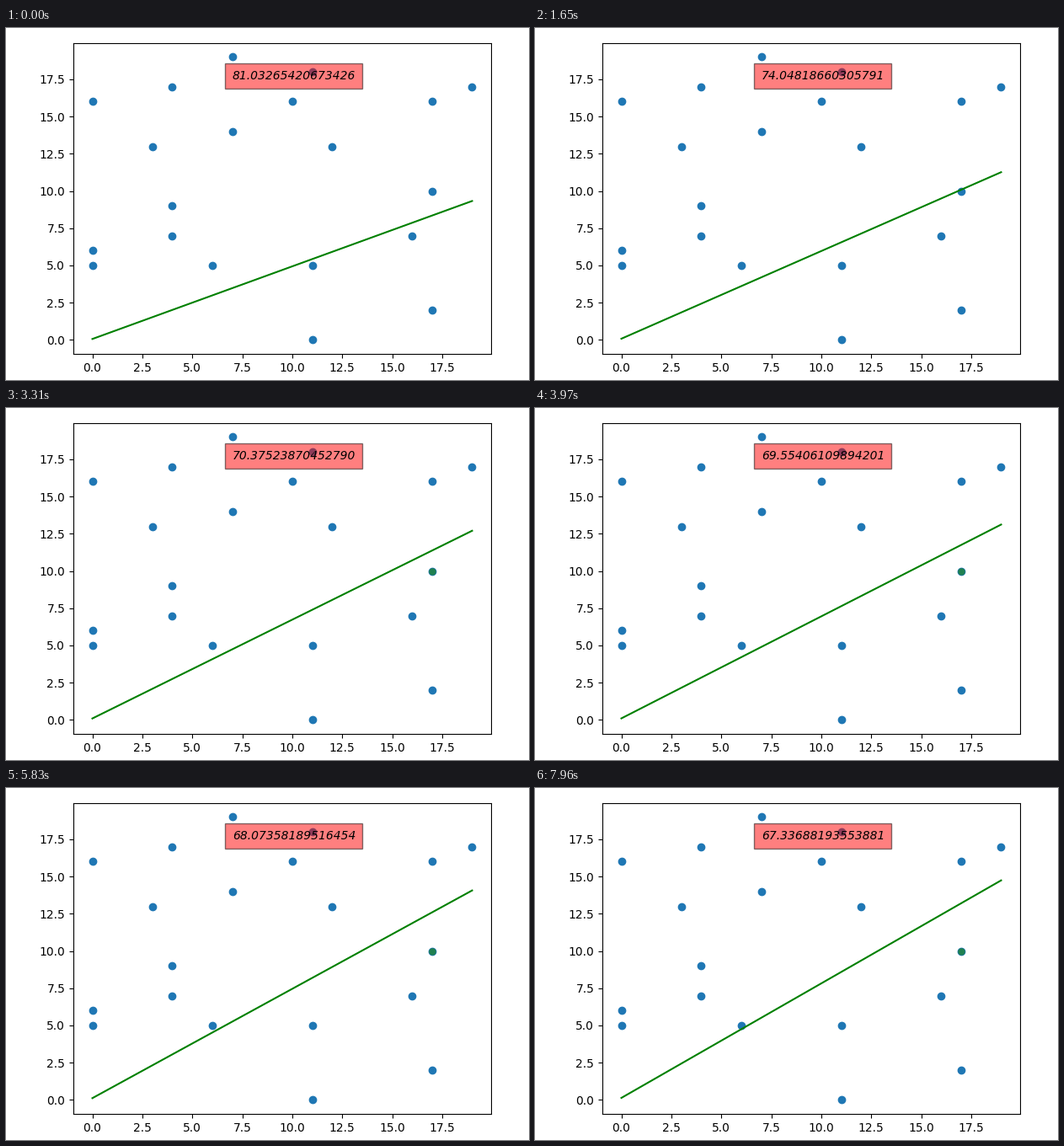
Animation, 621 px wide and 418 px high, one loop 8000 ms. Source, as a matplotlib script:

```python
import matplotlib.pyplot as plt
import numpy as np
from matplotlib.animation import FuncAnimation

W, H, DPI = 621, 418, 100
LOOP, TICK = 8000, 20
RATE, WARMUP, STEPS = 1e-4, 38, 75
LEAD, PACE = 22, 105.6  # ms before the first step and per step

X, Y = np.array([
    (0, 16), (0, 6), (0, 5), (3, 13), (4, 17), (4, 9), (4, 7), (6, 5),
    (7, 19), (7, 14), (10, 16), (11, 18), (11, 5), (11, 0), (12, 13),
    (16, 7), (17, 16), (17, 10), (17, 2), (19, 17)], float).T
CROSSED = (17, 10)  # the point that turns green once the line has passed


def descend(total):
    """Slope, intercept and mean squared error after each step."""
    m = b = 0.0
    states = []
    for _ in range(total + 1):
        err = Y - (m * X + b)
        states.append((m, b, np.mean(err ** 2)))
        m, b = (m + RATE * 2 * np.mean(X * err),
                b + RATE * 2 * np.mean(err))
    return states


states = descend(WARMUP + STEPS)[WARMUP:]

fig = plt.figure(figsize=(W / DPI, H / DPI), dpi=DPI, facecolor="white")
ax = fig.add_axes([80 / W, 30.8 / H, 496 / W, 369.6 / H])
ax.set(xlim=(-0.95, 19.95), ylim=(-0.95, 19.95))

ax.scatter(X, Y, color="#1f77b4")
tint = ax.scatter(*CROSSED, s=25, color="#1f8050")
line, = ax.plot([], [], color="green")
label = ax.text(7, 17.5, "", style="italic",
                bbox={"facecolor": "red", "alpha": 0.5, "pad": 6})


def update(frame):
    now = (frame + 0.5) * TICK
    step = min(max(int((now - LEAD) / PACE), 0), STEPS)
    m, b, loss = states[step]
    line.set_data(X, m * X + b)
    label.set_text(f"{loss:.14f}")
    x, y = CROSSED
    tint.set_visible(m * x + b > y + 0.3)
    return line, label, tint


anim = FuncAnimation(fig, update, frames=LOOP // TICK, interval=TICK,
                     repeat=True, repeat_delay=0, blit=False)
plt.show()
```
